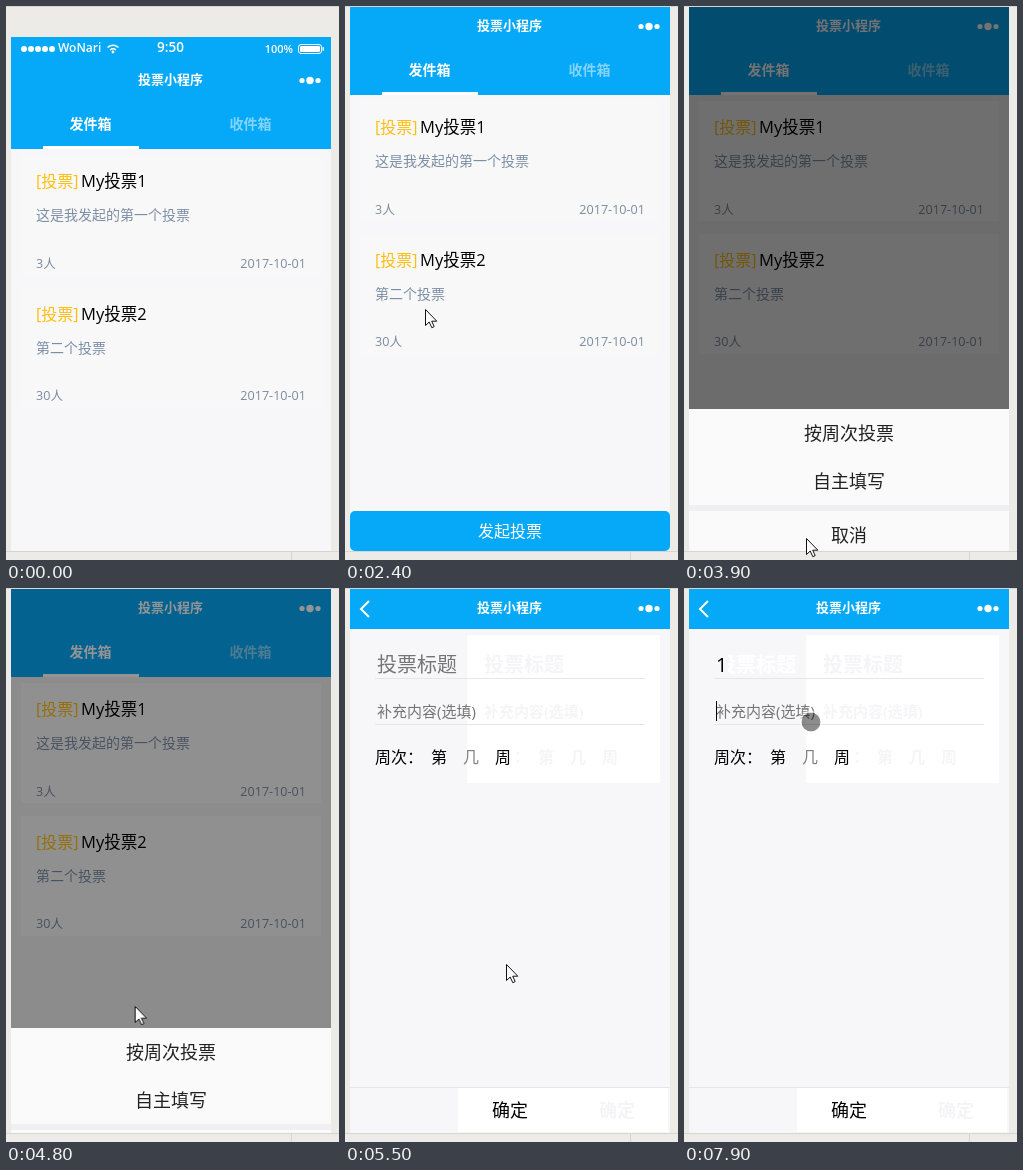
Write an HTML page that moves like this. It is 333 px wide and 554 px high and loops after 8 s.

```html
<!DOCTYPE html>
<html lang="zh-CN">
<head>
<meta charset="utf-8">
<title>投票小程序</title>
<style>
html, body { margin: 0; width: 100%; height: 100%; overflow: hidden; background: #ecebe7; }
svg { display: block; width: 333px; height: 554px; font-family: 'Open Sans', 'Noto Sans CJK SC', 'Noto Sans CJK', sans-serif; }
text { white-space: pre; }
.mid { text-anchor: middle; }
.end { text-anchor: end; }
.blue { fill: #05a9f8; }
.white { fill: #fff; }
.h { font-size: 16px; }
.name { font-size: 16.5px; }
.p { font-size: 14px; fill: #7c8ea6; }
.s { font-size: 12.6px; fill: #7c8c9f; }
.tag { fill: #ffbe12; }
.big { font-size: 18px; }

/* 1.25% of the loop is 100 ms */
.a { animation: 8s step-end -10ms infinite; }
.scroll { animation-name: scroll; }
.paper { animation-name: paper; }
.dim { animation-name: dim; }
.sheet { animation-name: sheet; }
.opened { animation-name: opened; }
.slide { animation-name: slide; }
.landed { animation-name: landed; }
.hint { animation-name: hint; }
.typed { animation-name: typed; }
.caret1 { animation-name: caret1; }
.caret2 { animation-name: caret2; }
.caret3 { animation-name: caret3; }
.pointer { animation-name: move; }
.arrow { animation-name: arrow; }
.touch { animation-name: touch; }

@keyframes scroll {
  0% { transform: translateY(54px); }
  12.5% { transform: translateY(54px); animation-timing-function: steps(3); }
  16.25%, 100% { transform: none; }
}
@keyframes paper { 0% { fill: #f7f7fa; } 47.5%, 100% { fill: #f0f0f3; } }
@keyframes dim {
  0% { opacity: 0; } 47.5% { opacity: .3; } 48.75% { opacity: .55; } 50% { opacity: .6; }
  60% { opacity: .42; } 61.25% { opacity: .18; } 62.5% { opacity: .04; } 63.75%, 100% { opacity: 0; }
}
@keyframes sheet {
  0% { transform: translateY(160px); } 47.5% { transform: translateY(90px); }
  48.75% { transform: translateY(8px); } 50% { transform: none; }
  60% { transform: translateY(45px); } 61.25% { transform: translateY(115px); }
  62.5%, 100% { transform: translateY(160px); }
}
@keyframes opened { 0% { opacity: 0; } 62.5%, 100% { opacity: 1; } }
@keyframes slide {
  0% { transform: translateX(330px); } 63.75% { transform: translateX(240px); }
  65% { transform: translateX(107px); } 66.25%, 100% { transform: none; }
}
@keyframes landed { 0% { opacity: 0; } 66.25%, 100% { opacity: 1; } }
@keyframes hint { 0% { opacity: 1; } 91.25%, 100% { opacity: 0; } }
@keyframes typed { 0% { opacity: 0; } 91.25%, 100% { opacity: 1; } }
@keyframes caret1 { 0% { opacity: 0; } 81.25% { opacity: 1; } 87.5%, 100% { opacity: 0; } }
@keyframes caret2 { 0% { opacity: 0; } 91.25% { opacity: 1; } 97.5%, 100% { opacity: 0; } }
@keyframes caret3 { 0% { opacity: 0; } 98.75%, 100% { opacity: 1; } }
@keyframes move {
  0% { transform: translate(-60px, 64px); }
  5% { transform: translate(298px, 64px); animation-timing-function: steps(3); }
  8.75% { transform: translate(181px, 129px); }
  18.75% { transform: translate(181px, 129px); animation-timing-function: steps(2); }
  21.25% { transform: translate(189px, 145px); animation-timing-function: steps(7); }
  30% { transform: translate(80px, 303px); animation-timing-function: steps(8); }
  40% { transform: translate(114px, 528px); }
  42.5% { transform: translate(122px, 531px); }
  48.75% { transform: translate(122px, 532px); animation-timing-function: steps(7); }
  57.5% { transform: translate(130px, 422px); }
  58.75% { transform: translate(130px, 422px); animation-timing-function: steps(3); }
  62.5% { transform: translate(126px, 410px); animation-timing-function: steps(5); }
  68.75% { transform: translate(161px, 376px); }
  70% { transform: translate(161px, 376px); animation-timing-function: steps(4); }
  75% { transform: translate(123px, 130px); animation-timing-function: steps(2); }
  77.5% { transform: translate(133px, 79px); }
  92.5% { transform: translate(133px, 79px); animation-timing-function: steps(3); }
  96.25%, 100% { transform: translate(127px, 134px); }
}
@keyframes arrow { 0% { opacity: 1; } 40% { opacity: 0; } 47.5% { opacity: 1; } 75%, 100% { opacity: 0; } }
@keyframes touch { 0% { opacity: 0; } 40% { opacity: 1; } 47.5% { opacity: 0; } 75%, 100% { opacity: 1; } }
</style>
</head>
<body>
<svg viewBox="0 0 333 554">
  <defs>
    <clipPath id="screen"><rect x="5" y="1" width="320" height="544"/></clipPath>
    <clipPath id="right"><rect x="15" y="41" width="300" height="504"/></clipPath>
    <g id="title">
      <text class="mid white" x="164.5" y="24" font-size="13" font-weight="700">投票小程序</text>
      <g class="white"><circle cx="296" cy="20.5" r="2.6"/><circle cx="304" cy="20.5" r="3.7"/><circle cx="312" cy="20.5" r="2.6"/></g>
    </g>
    <g id="echo">
      <text x="32" y="83.5" font-size="20">投票标题</text>
      <text x="32" y="129" font-size="15">补充内容(选填)</text>
      <text class="h" y="175"><tspan x="62">：</tspan><tspan x="86">第</tspan><tspan x="118">几</tspan><tspan x="150">周</tspan></text>
      <text class="mid big" x="165" y="529">确定</text>
    </g>
  </defs>

  <rect width="333" height="554" fill="#ecebe7"/>
  <path d="M0 .5H333M0 545.5H333M285.5 546V554" stroke="#d6d5d1"/>

  <g clip-path="url(#screen)">
    <g class="a scroll">
      <rect class="a paper" x="5" y="-23" width="320" height="568"/>
      <rect x="15" y="95" width="300" height="120" fill="#f8f8f8"/>
      <rect x="15" y="228" width="300" height="120" fill="#f8f8f8"/>
      <rect class="blue" x="5" y="-23" width="320" height="112"/>

      <g class="white">
        <circle cx="18" cy="-11" r="3"/><circle cx="25" cy="-11" r="3"/><circle cx="32" cy="-11" r="3"/><circle cx="39" cy="-11" r="3"/><circle cx="46" cy="-11" r="3"/>
        <text x="52" y="-8" font-size="12" font-weight="600">WoNari</text>
        <text class="mid" x="164.5" y="-8" font-size="13.5" font-weight="600">9:50</text>
        <text class="end" x="287" y="-7" font-size="11" font-weight="600">100%</text>
        <circle cx="107" cy="-8" r="1.4"/>
        <path d="M101.5 -12.5Q107 -17 112.5 -12.5M104 -10Q107 -12.5 110 -10" fill="none" stroke="#fff" stroke-width="1.6"/>
        <rect x="292.5" y="-15.5" width="23" height="9" rx="2.5" fill="none" stroke="#fff"/>
        <rect x="294" y="-14" width="20" height="6" rx="1"/>
        <rect x="316.5" y="-13" width="1.5" height="4" rx=".7"/>
      </g>
      <use href="#title"/>
      <g class="mid" font-size="14" fill="#fff">
        <text x="84.5" y="69" font-weight="700">发件箱</text>
        <text x="244.5" y="69" opacity=".5" font-weight="700">收件箱</text>
      </g>
      <rect class="white" x="37" y="86" width="96" height="3"/>

      <text class="h tag" x="30" y="127">[投票]</text>
      <text class="name" x="75" y="127">My投票1</text>
      <text class="p" x="30" y="160">这是我发起的第一个投票</text>
      <text class="s" x="30" y="208">3人</text>
      <text class="s end" x="300" y="208">2017-10-01</text>

      <text class="h tag" x="30" y="260">[投票]</text>
      <text class="name" x="75" y="260">My投票2</text>
      <text class="p" x="30" y="293">第二个投票</text>
      <text class="s" x="30" y="340">30人</text>
      <text class="s end" x="300" y="340">2017-10-01</text>

      <rect class="blue" x="5" y="505" width="320" height="40" rx="5"/>
      <text class="h mid white" x="165" y="531">发起投票</text>
    </g>

    <g class="a opened">
      <rect x="5" y="41" width="320" height="49" fill="#f9f9f9"/>
      <rect x="5" y="541" width="320" height="4" fill="#f9f9f9"/>
    </g>

    <g class="a slide">
      <rect x="5" y="41" width="320" height="504" fill="#f7f7fa"/>
      <g class="a landed">
        <rect class="white" x="122" y="47" width="193" height="148"/>
        <rect class="white" x="113" y="500" width="210" height="44"/>
        <g clip-path="url(#right)"><use href="#echo" x="107" fill="#f5f5f7" font-weight="600"/></g>
      </g>
      <path d="M30 90.5H300M30 136.5H300M5 499.5H325" stroke="#e6e6e8"/>
      <text class="a hint" x="32" y="83.5" font-size="20" fill="#757575">投票标题</text>
      <g class="a typed" font-size="20">
        <text class="white" x="32" y="83.5" font-weight="600">投票标题</text>
        <rect x="30" y="64" width="14" height="24" fill="#f7f7fa"/>
        <text x="32" y="83.5">1</text>
      </g>
      <text x="32" y="129" font-size="15" fill="#757575">补充内容(选填)</text>
      <text class="h" y="175"><tspan x="30">周次：</tspan><tspan x="86">第</tspan><tspan x="118" fill="#808080">几</tspan><tspan x="150">周</tspan></text>
      <text class="mid big" x="165" y="529">确定</text>
      <rect class="a caret1" x="32" y="64" width="1" height="23"/>
      <rect class="a caret2" x="44" y="64" width="1" height="23"/>
      <rect class="a caret3" x="32" y="113" width="1" height="20"/>
    </g>

    <g class="a opened">
      <rect class="blue" x="5" y="1" width="320" height="40"/>
      <use href="#title"/>
      <path d="M24 13L16 21L24 29" fill="none" stroke="#fff" stroke-width="2"/>
    </g>

    <rect class="a dim" x="5" y="1" width="320" height="544"/>

    <g class="a sheet">
      <rect x="5" y="395" width="320" height="150" fill="#fafafa"/>
      <rect x="5" y="491" width="320" height="6" fill="#f0f0f3"/>
      <g class="mid big" fill="#222">
        <text x="165" y="426">按周次投票</text>
        <text x="165" y="474">自主填写</text>
        <text x="165" y="528">取消</text>
      </g>
    </g>
  </g>

  <g class="a pointer">
    <path class="a arrow" d="M.5 .5V16.5L4.2 13L6.8 18.7L9.2 17.6L6.7 12.2H11.8Z" fill="#fff" stroke="#111" stroke-linejoin="round"/>
    <g class="a touch">
      <circle r="9.5" fill-opacity=".45"/>
      <circle r="10.5" fill="none" stroke="#fff" stroke-opacity=".45" stroke-width="2"/>
    </g>
  </g>
</svg>
</body>
</html>
```
